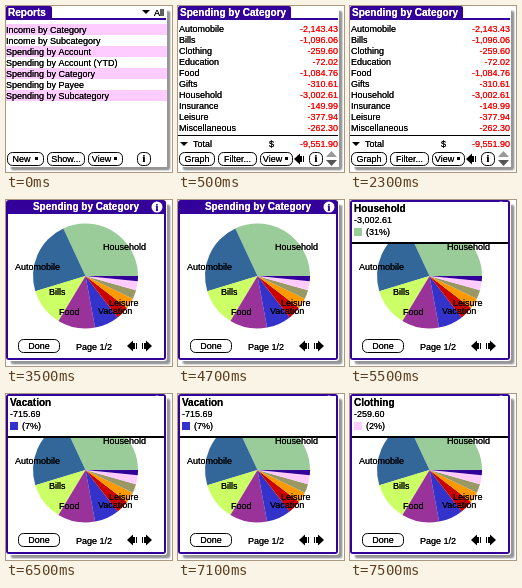
These frames come from a looping animation (166x166 px, 8 s). An HTML page with a canvas:

```html
<!DOCTYPE html>
<html lang="en">
<head>
<meta charset="utf-8">
<title>Spending reports</title>
<style>
html, body { margin: 0; width: 100%; height: 100%; overflow: hidden; background: #fff; }
canvas { display: block; width: 166px; height: 166px; }
</style>
</head>
<body>
<canvas id="stage" width="166" height="166"></canvas>
<script>
const ctx = document.getElementById('stage').getContext('2d');
const NAVY = '#330099', PINK = '#ffccff', RED = '#ff0000';
const FAMILY = '"Liberation Sans", Arial, sans-serif';
const PLAIN = '9px ' + FAMILY, BOLD = 'bold 10px ' + FAMILY;
const INFO = 'bold 10px "Liberation Serif", serif';

const reports = ['Income by Category', 'Income by Subcategory', 'Spending by Account',
  'Spending by Account (YTD)', 'Spending by Category', 'Spending by Payee', 'Spending by Subcategory'];

const spending = [
  ['Automobile', '-2,143.43'], ['Bills', '-1,096.06'], ['Clothing', '-259.60'],
  ['Education', '-72.02'], ['Food', '-1,084.76'], ['Gifts', '-310.61'],
  ['Household', '-3,002.61'], ['Insurance', '-149.99'], ['Leisure', '-377.94'],
  ['Miscellaneous', '-262.30']
];

// amount, colour; counterclockwise from three o'clock
const slices = [
  [3002.61, '#99cc99'], [2143.43, '#336699'], [1096.06, '#ccff66'], [1084.76, '#993399'],
  [715.69, '#3333cc'], [377.94, '#cc0000'], [310.61, '#ff9900'], [262.30, '#999966'],
  [259.60, PINK], [149.99, NAVY]
];

const labels = [['Household', 97, 50], ['Automobile', 9, 70], ['Bills', 43, 95],
  ['Food', 53, 115], ['Vacation', 92, 114], ['Leisure', 103, 106]];

function rect(x, y, w, h, color = '#000') {
  ctx.fillStyle = color;
  ctx.fillRect(x, y, w, h);
}

// Two passes give the dark, crisp look of a small screen font.
function text(str, x, y, color = '#000', font = PLAIN, align = 'left') {
  ctx.font = font;
  ctx.textAlign = align;
  ctx.fillStyle = color;
  ctx.fillText(str, x, y);
  ctx.fillText(str, x, y);
}

function shape(points, color = '#000') {
  ctx.beginPath();
  points.forEach(([x, y]) => ctx.lineTo(x, y));
  ctx.fillStyle = color;
  ctx.fill();
}

function round(x, y, w, h, r, color) {
  ctx.beginPath();
  ctx.roundRect(x, y, w, h, r);
  ctx.fillStyle = color;
  ctx.fill();
}

function button(label, x, w, y = 146, dot = 0) {
  ctx.beginPath();
  ctx.roundRect(x + .5, y + .5, w - 1, 13, 5);
  ctx.strokeStyle = '#000';
  ctx.lineWidth = 1;
  ctx.stroke();
  text(label, x + w / 2 - (dot ? 4 : 0), y + 10, '#000', PLAIN, 'center');
  if (dot) rect(dot, y + 5, 3, 3);
}

function infoButton(x) {
  button('', x, 14);
  text('i', x + 7, 156, '#000', INFO, 'center');
}

function downMark(x, y) {
  shape([[x, y], [x + 8, y], [x + 4, y + 4]]);
}

// side is -1 for left, 1 for right
function arrow(x, y, side) {
  shape([[x, y - 5.5], [x + side * 6, y], [x, y + 5.5]]);
  rect(side > 0 ? x - 2 : x, y - 3, 2, 6);
  rect(side > 0 ? x - 4 : x + 3, y - 3, 1, 6);
}

function backdrop(radius) {
  rect(0, 0, 166, 166, '#fff');
  for (let i = 0; i < 4; i++) {
    const g = 225 - i * 25;
    round(4 + i / 2, 4 + i / 2, 161 - i, 161 - i, 3, `rgb(${g},${g},${g})`);
  }
  round(0, 0, 161, 161, radius, '#fff');
}

function tab(title, width) {
  round(0, 0, width, 14, [2, 2, 0, 0], NAVY);
  rect(0, 12, 160, 2, NAVY);
  text(title, 2, 10, '#fff', BOLD);
}

function drawReports() {
  backdrop(0);
  tab('Reports', 46);
  downMark(136, 4);
  text('All', 148, 10);
  reports.forEach((name, i) => {
    if (i % 2 === 0) rect(0, 18 + i * 11, 161, 11, PINK);
    text(name, 0, 27 + i * 11);
  });
  button('New', 1, 37, 146, 29);
  button('Show...', 41, 38);
  button('View', 82, 35, 146, 108);
  infoButton(131);
}

function drawTable() {
  backdrop(0);
  tab('Spending by Category', 113);
  spending.forEach(([name, amount], i) => {
    const y = 26 + i * 11;
    text(name, 1, y);
    text(amount, 160, y, RED, PLAIN, 'right');
  });
  rect(0, 129, 160, 1);
  downMark(2, 136);
  text('Total', 15, 141);
  text('$', 91, 141);
  text('-9,551.90', 160, 141, RED, PLAIN, 'right');
  button('Graph', 1, 36);
  button('Filter...', 40, 39);
  button('View', 82, 33, 146, 107);
  arrow(122, 153, -1);
  infoButton(131);
  shape([[148, 151], [153.5, 145], [159, 151]], '#999');
  shape([[148, 154], [159, 154], [153.5, 160]], '#555');
}

function drawPie() {
  const total = slices.reduce((sum, s) => sum + s[0], 0);
  let angle = 0;
  for (const [amount, color] of slices) {
    const next = angle - amount / total * Math.PI * 2;
    ctx.beginPath();
    ctx.moveTo(79.5, 76);
    ctx.arc(79.5, 76, 52.5, angle, next, true);
    ctx.fillStyle = color;
    ctx.fill();
    angle = next;
  }
  labels.forEach(([name, x, y]) => text(name, x, y));
}

function drawGraph() {
  backdrop(3);
  round(0, 0, 160, 160, 3, NAVY);
  rect(2, 14, 156, 144, '#fff');
  text('Spending by Category', 80, 10, '#fff', BOLD, 'center');
  ctx.beginPath();
  ctx.arc(151, 7, 5.5, 0, Math.PI * 2);
  ctx.fillStyle = '#fff';
  ctx.fill();
  text('i', 151, 10.5, NAVY, INFO, 'center');
  drawPie();
  button('Done', 12, 42, 139);
  text('Page 1/2', 70, 150);
  arrow(127, 146, -1);
  arrow(140, 146, 1);
}

function drawDetail(name, amount, share, color) {
  drawGraph();
  rect(2, 2, 156, 42);
  rect(2, 2, 156, 40, '#fff');
  text(name, 4, 12, '#000', BOLD);
  text(amount, 4, 23);
  rect(4, 28, 8, 8, color);
  text(`(${share}%)`, 16, 35);
}

const scenes = [
  [500, drawReports],
  [3500, drawTable],
  [5500, drawGraph],
  [6500, () => drawDetail('Household', '-3,002.61', 31, '#99cc99')],
  [7500, () => drawDetail('Vacation', '-715.69', 7, '#3333cc')],
  [8000, () => drawDetail('Clothing', '-259.60', 2, PINK)]
];

const start = performance.now();

function tick() {
  const t = (performance.now() - start) % 8000;
  scenes.find(([end]) => t < end)[1]();
  requestAnimationFrame(tick);
}
tick();
</script>
</body>
</html>
```
